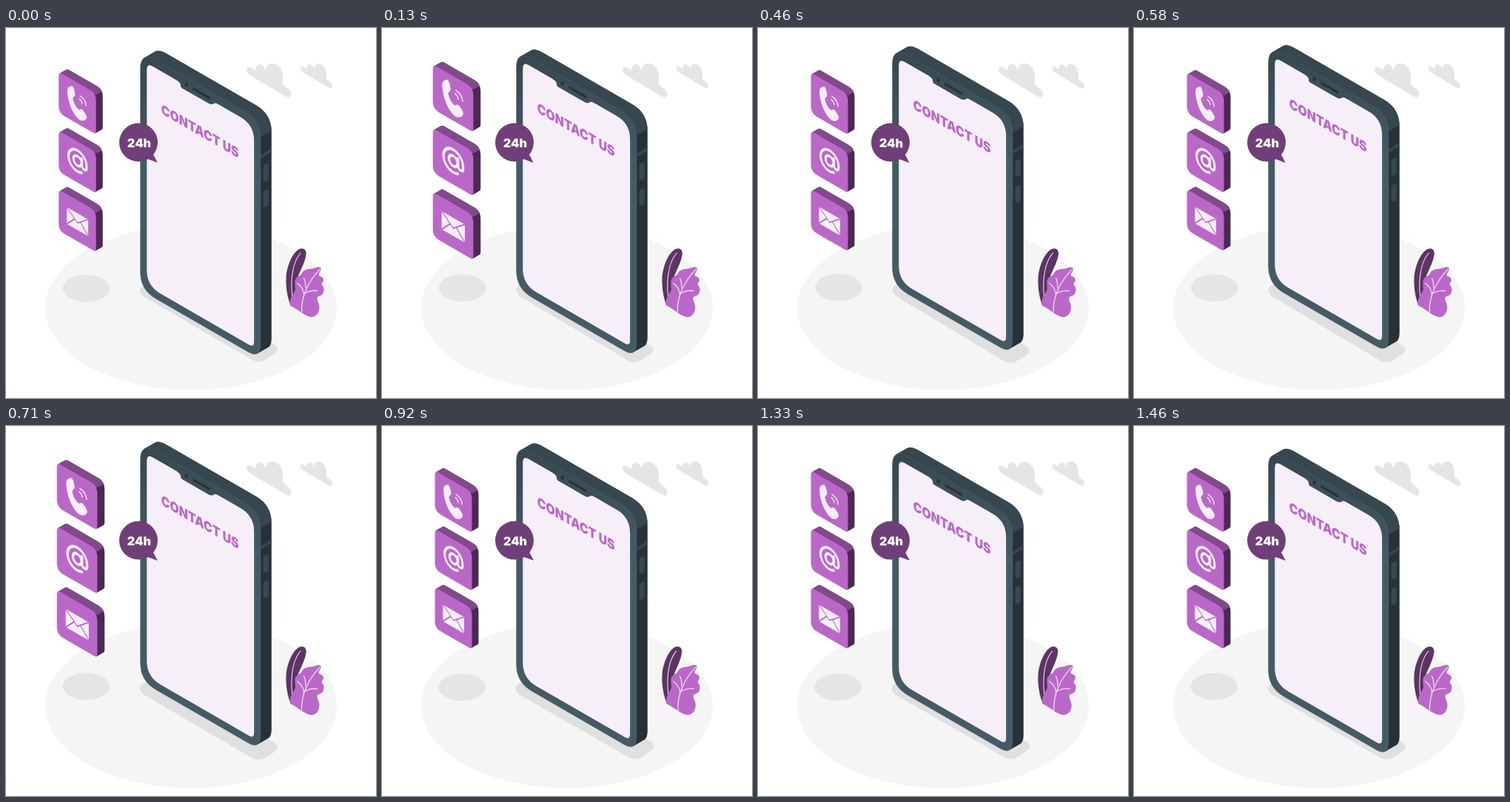
Recreate the animation shown at these times as an HTML page. Size 500x500 px, loop 1.5 s.

```html
<!DOCTYPE html>
<html lang="en">
<head>
<meta charset="utf-8">
<title>Contact us</title>
<style>
  html, body { margin: 0; width: 100%; height: 100%; overflow: hidden; background: #fff; }
  svg { display: block; width: 100vw; height: 100vh; }
  text { font-family: Inter, "Open Sans", sans-serif; font-weight: 900; }
  .line { fill: none; stroke-linecap: round; stroke-linejoin: round; }
</style>
</head>
<body>
<svg id="stage" viewBox="0 0 500 500" xmlns="http://www.w3.org/2000/svg">
  <defs>
    <linearGradient id="bezel" x1="0" y1="0" x2="0" y2="1">
      <stop offset="0" stop-color="#37474f"/>
      <stop offset=".35" stop-color="#455a64"/>
    </linearGradient>
    <path id="cloud" d="M326 60Q323 53 329 53Q333 54 337 58Q337 49 343 49Q348 50 351 57Q352 48 360 48Q373 50 374.500 66Q374.500 70 374 75Q376 79 381 81.500Q386 86 385.500 91Q384 95 379 93L334 66.500Q328 63 326 60Z"/>
  </defs>

  <ellipse cx="250" cy="377.900" rx="197" ry="111.600" fill="#f5f5f5"/>

  <g id="shadows">
    <ellipse cx="108.400" cy="352" rx="31.800" ry="18.300" fill="#e5e5e5"/>
    <path fill="#e0e0e0" d="M192 344L184 349Q177 355 186 363L332 448Q341 453.500 350 448.500L363 440Q371 434 363 428L350 420Z"/>
  </g>

  <g id="clouds" fill="#e5e5e5">
    <use href="#cloud"/>
    <use href="#cloud" transform="translate(163.500 13.600) scale(.72)"/>
  </g>

  <g id="plant">
    <path fill="#5d3464" d="M385 375.500C380.500 366 378 350 378.500 339C379 321 388 302 397 298.500C402 296.500 406.500 300 405.500 306C404 318 396 330 393 341C390 352 391 364 393 378Z"/>
    <path class="line" stroke="#f6eef8" d="M398 304C386 318 383 346 388.500 374"/>
    <path fill="#ba68c8" d="M384 375C383 368 386 362 389.500 357C392.500 353 390 349 390.500 343C391 336 396.500 336 399 333C401.500 327 406 326 412 325.500C417 325 422 321.500 425 323.500C427.500 327 422 331 422.500 334C424 336 429 336 429 340.500C428.500 344 426 344 427 347.500C430 350 430.500 355 428 359.500C425 363 420.500 361.500 420.500 365.500C420.500 369 423.500 372 423.500 377C423.500 385 419 391 412 390.500C403 389 396 381 384 375Z"/>
    <g class="line" stroke="#f6eef8" stroke-width="1.100">
      <path d="M399.500 384C399 361 408 343 424 326"/>
      <path d="M402.500 360C402 353 398 348 393.500 345"/>
      <path d="M403 359Q411 354 421 355"/>
      <path d="M405 351Q405 343 402.500 338"/>
    </g>
  </g>

  <g id="phone">
    <g id="body"></g>
    <g id="screen"></g>
    <path fill="#3d505a" d="M231 68.500V70.500Q236 73.500 236 77Q236 80 239 81.500L274 101.700Q278 104 281 101.700Q283.500 100 288 103V100Z"/>
    <ellipse cx="243.700" cy="76.500" rx="2.100" ry="2.700" fill="#263238"/>
    <path class="line" stroke="#263238" stroke-width="3" d="M253.500 81.800L275 94.200"/>
    <path fill="#37474f" d="M344 171.500L358.500 162.500V167L344 176Z"/>
    <g id="buttons"></g>
    <text transform="matrix(.866 .5 0 1 209.800 115.100)" font-size="18.200" fill="#ba68c8">CONTACT US</text>
  </g>

  <g id="tiles"></g>

  <g id="bubble">
    <circle cx="179" cy="154.600" r="26" fill="#703e78"/>
    <path fill="#703e78" d="M182 180Q190 179.500 191.500 177L204.800 182L196 165Z"/>
    <text x="180" y="161.300" font-size="16.300" fill="#fff" text-anchor="middle">24h</text>
  </g>
</svg>
<script>
const $ = id => document.getElementById(id);
const SLOPE = 0.577, PERIOD = 1500, PHASE = 15;
let clips = 0;

// Rounded isometric face; radii run clockwise from the top left.
function face(x, y, w, h, [a, b, c, d]) {
  const r = x + w, t = y + w * SLOPE;
  const p = (px, py, n = 0) => `${px + n * 0.866} ${py + n * 0.5}`;
  return `M${p(x, y + a)}Q${p(x, y)} ${p(x, y, a)}` +
    `L${p(r, t, -b)}Q${p(r, t)} ${p(r, t + b)}` +
    `L${p(r, t + h - c)}Q${p(r, t + h)} ${p(r, t + h, -c)}` +
    `L${p(x, y + h, d)}Q${p(x, y + h)} ${p(x, y + h - d)}Z`;
}

// Extruded face: dark right side, lighter top side, front on top.
function block({ x, y, w, h, radii, depth, fold, front, top, side, edge }) {
  const dy = -depth * SLOPE, r = x + w, t = y + w * SLOPE;
  const [a, , c] = radii;
  const x1 = x + 0.2165 * a, y1 = y + 0.375 * a;
  const x2 = r - 0.2165 * c, y2 = t + h - 0.375 * c;
  const hull = face(x + depth, y + dy, w, h, radii) +
    `M${x1} ${y1}L${x1 + depth} ${y1 + dy}L${x2 + depth} ${y2 + dy}L${x2} ${y2}Z`;
  const id = 'fold' + clips++, fy = t + fold;
  return `<clipPath id="${id}"><path d="M${x - 9} ${y - 60}H${r + 2 * depth}V${fy + 2 * dy}L${r} ${fy}L${x - 9} ${y + 30}Z"/></clipPath>
    <path d="${hull}" fill="${side}"/>
    <path d="${hull}" fill="${top}" clip-path="url(#${id})"/>
    <path d="${face(x, y, w, h, radii)}" fill="${front}" stroke="${edge || 'none'}" stroke-width=".4"/>`;
}

$('body').innerHTML = block({
  x: 181.5, y: 31, w: 162.5, h: 322.3, radii: [24, 24, 20, 24], depth: 14.8, fold: 22,
  front: 'url(#bezel)', top: '#37474f', side: '#263238', edge: '#566b75'
});
$('screen').innerHTML = `<path fill="#f6eff8" d="${face(190.3, 46.9, 144.9, 301, [9, 21, 8, 21])}"/>`;
$('buttons').innerHTML = [0, 35].map(y => `<g transform="translate(0 ${y})">
  <path fill="#37474f" d="M348 189Q348 185 351 183.500Q355 181.500 355 185V201Q355 205 352 206.300Q348 208 348 204Z"/>
  <path class="line" stroke="#455a64" stroke-width=".8" d="M348.500 204V189Q348.500 186 351 184.300"/></g>`).join('');

const icons = [
  `<path fill="#f6eef8" d="M83 86C83 81 86 79 90 79.500C92 82 93 87 93.500 91C93 94 90.500 94 90.500 96.500C91.500 102 94.500 107.500 98 110.500C100.500 111.500 101 109 103 110.500C106 113.500 108.500 117.500 109.200 121.500C108 125.500 104 127 99 124.500C90 117 83.500 100 83 86Z"/>
   <path class="line" stroke="#f6eef8" stroke-width="1.300" d="M99 96.500Q102.500 99 103 103.500M100 92.500Q107.500 97 108.300 106"/>`,
  `<g class="line" transform="matrix(.866 .5 0 1 96.700 100.800)" stroke="#f6eef8" stroke-width="3.500">
     <circle r="6.300"/><path d="M6.800 -6.500V3A3.600 3.600 0 0 0 14 3V0A14 14 0 1 0 6.500 12.400"/></g>`,
  `<g transform="matrix(.866 .5 0 1 82.400 83.900)"><path fill="#f6eef8" d="M0 0H33V22.400H0Z"/>
     <path class="line" stroke="#ba68c8" stroke-width="1.500" d="M0 0L16.500 13L33 0M0 22.400L12 9.800M33 22.400L21 9.800"/></g>`
];
$('tiles').innerHTML = icons.map((icon, i) => `<g transform="translate(0 ${i * 78.8})">${block({
  x: 71.5, y: 60.3, w: 50, h: 55, radii: [6, 9, 4, 9], depth: 9, fold: 2,
  front: '#ba68c8', top: '#82498c', side: '#4a2a50'
})}${icon}</g>`).join('');

// The CSS "ease" curve, solved by bisection.
function ease(u) {
  let lo = 0, hi = 1, s = 0.5;
  for (let i = 0; i < 24; i++) {
    if (0.75 * s * (1 - s) + s ** 3 < u) lo = s; else hi = s;
    s = (lo + hi) / 2;
  }
  return 0.3 * s * (1 - s) ** 2 + 3 * s * s * (1 - s) + s ** 3;
}

// Value through [position, value] pairs, eased within each span.
function track(keys, p, curve = u => u) {
  const i = Math.max(1, keys.findIndex(k => k[0] >= p));
  const [p0, v0] = keys[i - 1], [p1, v1] = keys[i];
  return v0 + (v1 - v0) * curve((p - p0) / (p1 - p0));
}

const floatY = [[0, 0.6], [0.5, -9.4], [1, 0.6]];
const wind = [[0, 0], [0.25, 1], [0.75, -1], [1, 0]];
const beat = [[0, 1], [0.1, 1.094], [0.3, 1], [0.4, 1], [0.5, 1.094], [0.6, 1], [1, 1]];
const pivots = { shadows: [222, 392], clouds: [383, 71], plant: [404, 344], bubble: [179, 155] };

function draw(ms) {
  const p = ((ms + PHASE) % PERIOD) / PERIOD;
  const turn = track(wind, p);
  $('phone').setAttribute('transform', `translate(0 ${track(floatY, p)})`);
  $('tiles').setAttribute('transform', `translate(101 178.500) scale(${track(beat, p, ease)}) translate(-101 -178.500)`);
  for (const id in pivots) $(id).setAttribute('transform', `rotate(${turn} ${pivots[id]})`);
}

let start;
function tick(now) {
  start ??= now;
  draw(now - start);
  requestAnimationFrame(tick);
}
draw(0);
requestAnimationFrame(tick);
</script>
</body>
</html>
```
